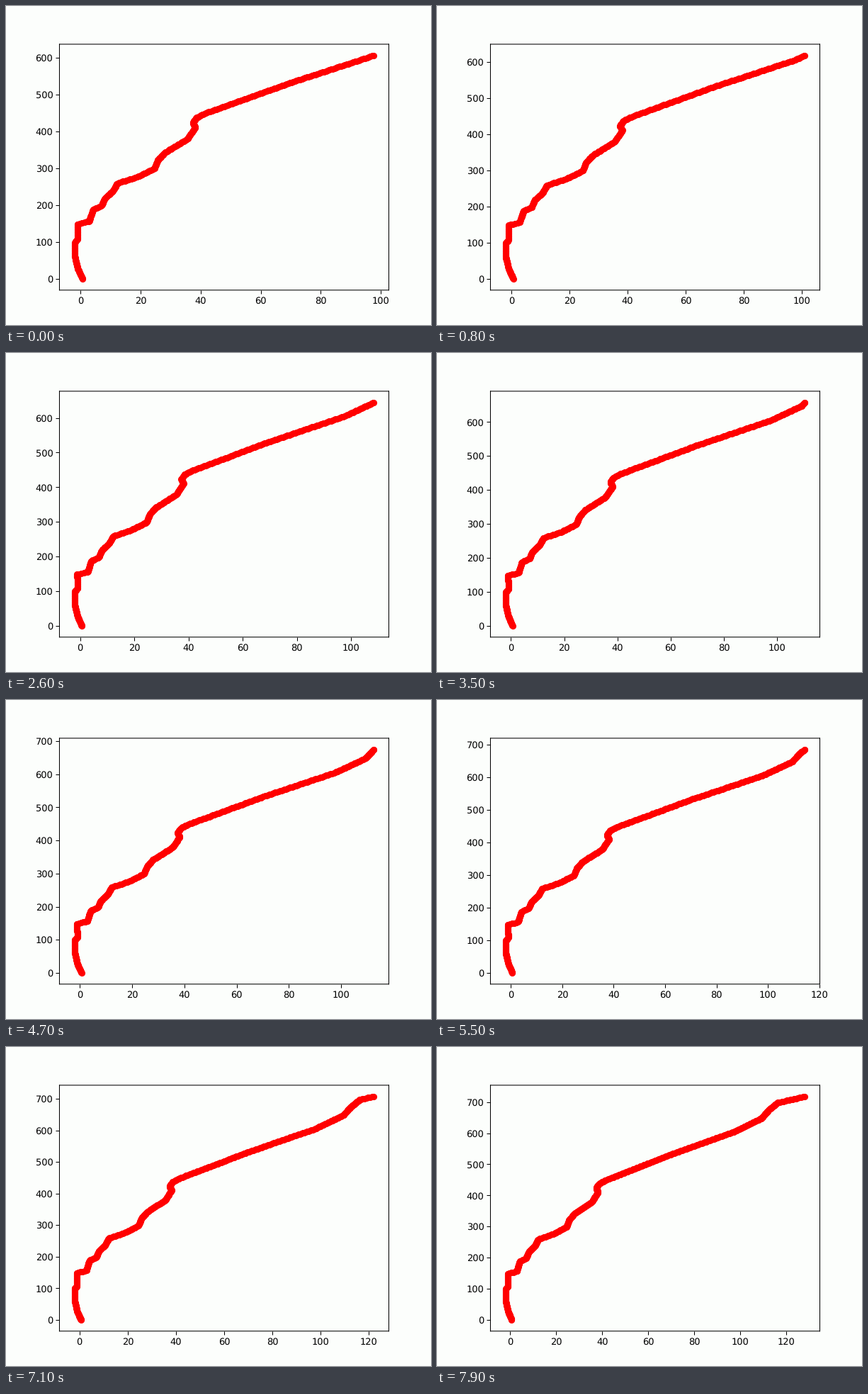
Animation of 600x450 px, one loop 8000 ms. Source, as a matplotlib script:

```python
import numpy as np
import matplotlib.pyplot as plt
from matplotlib.animation import FuncAnimation

FRAMES, INTERVAL = 80, 100
START_COUNT = 400
START_Y, RISE, BULGE = 605.5, 112.7, 10
PAPER = "#fcfefc"

# Corners of the path, ordered by height
CORNERS = [
    (0.6, 0), (-1, 28), (-2.1, 65), (-1.9, 100), (-1, 108), (-1.1, 149),
    (2.8, 156), (4.1, 188), (6.9, 198), (8, 218), (10.7, 238), (12.2, 259),
    (19, 277), (24.5, 299), (25.7, 322), (28, 342), (35.5, 379),
    (38.2, 411), (37.3, 423), (38.6, 437), (41.2, 448), (70, 532),
    (97.7, 605.5), (109.3, 648), (112.4, 674.3), (116.3, 698), (128.2, 718.2),
]

# The tip climbs almost steadily, slowing slightly
u = np.linspace(0, 1, FRAMES)
tip = START_Y + u * (RISE + BULGE * (1 - u))
ys = np.concatenate([np.linspace(0, START_Y, START_COUNT), tip[1:]])
corner_x, corner_y = zip(*CORNERS)
xs = np.interp(ys, corner_y, corner_x)

plt.rcParams.update({"font.family": "DejaVu Sans", "text.hinting": "none"})
fig, ax = plt.subplots(figsize=(6.4, 4.8), dpi=93.75, facecolor=PAPER)
fig.subplots_adjust(left=80.5 / 640, right=576.5 / 640,
                    bottom=52.5 / 480, top=422.5 / 480)
ax.set_facecolor(PAPER)
for spine in ax.spines.values():
    spine.set_snap(False)
dots, = ax.plot([], [], "ro")


def padded(values, margin=0.05):
    lo, hi = values.min(), values.max()
    pad = margin * (hi - lo)
    return lo - pad, hi + pad


def update(i):
    n = START_COUNT + i
    dots.set_data(xs[:n], ys[:n])
    ax.set_xlim(padded(xs[:n]))
    ax.set_ylim(padded(ys[:n]))
    return dots,


anim = FuncAnimation(fig, update, frames=FRAMES, interval=INTERVAL,
                     init_func=lambda: update(0), repeat=True, repeat_delay=0)
plt.show()
```
